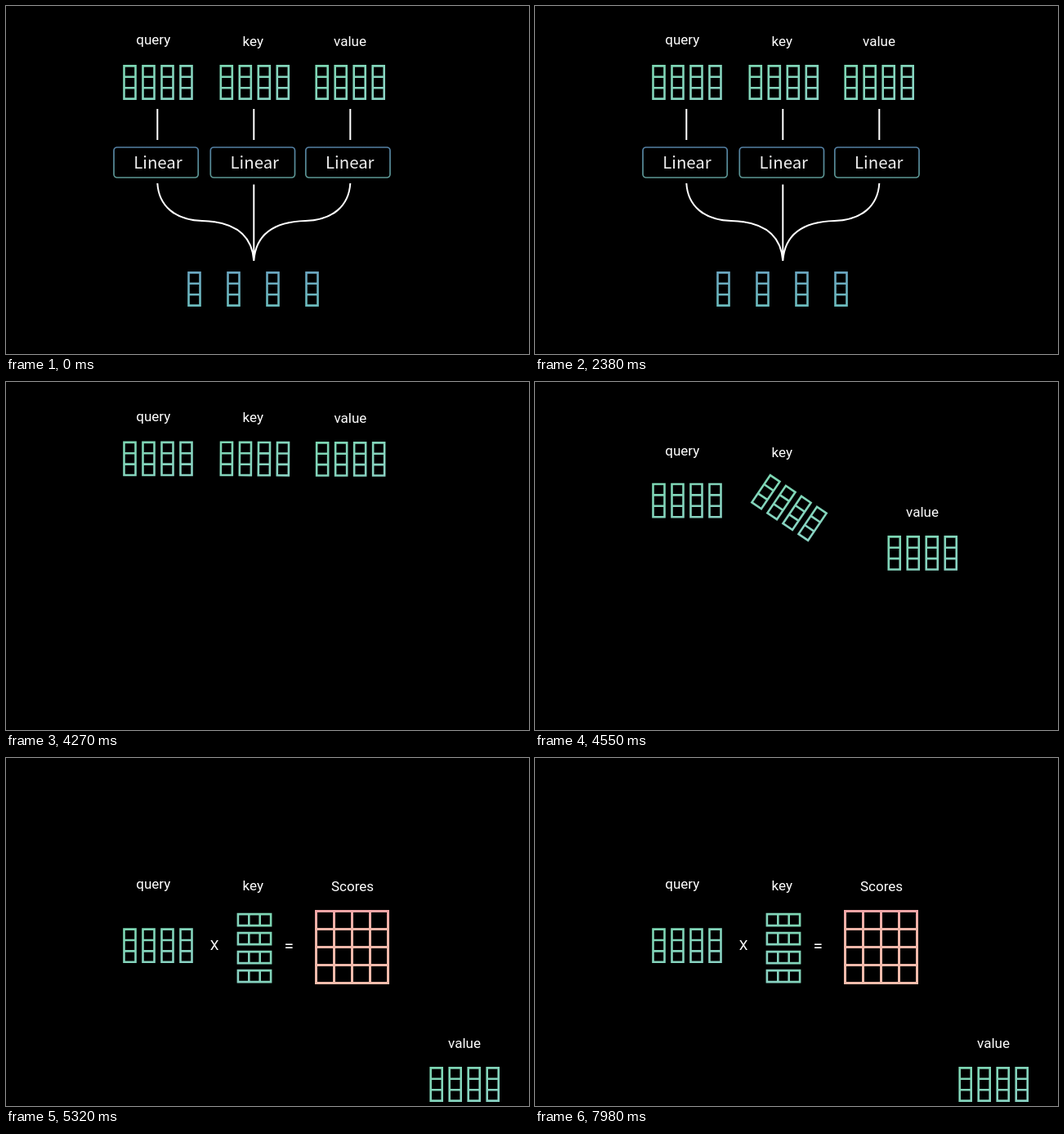
An HTML page that plays this animation: 640 px wide and 426 px high, repeating every 8000 ms.

```html
<!DOCTYPE html>
<html lang="en">
<head>
<meta charset="utf-8">
<style>
  html, body { margin: 0; width: 100%; height: 100%; overflow: hidden; background: #000; }
  svg { display: block; }
  text { font: 17px Roboto, sans-serif; fill: #fff; text-anchor: middle; }
  .linear { font: 500 20.4px "Noto Sans CJK SC", "Noto Sans CJK JP", "Open Sans", sans-serif; fill: #f0f0f0; }
  .sign { font-size: 21px; }
  path, rect { fill: none; }
  .wire { stroke: #fff; stroke-width: 2; }
  .block { stroke-width: 2.6; }
  .frame { stroke: url(#frame); stroke-width: 1.7; }
  .grid { stroke: url(#pink); stroke-width: 3; }
</style>
</head>
<body>
<svg id="stage" width="640" height="426" viewBox="0 0 640 426">
  <defs>
    <linearGradient id="green" x2="1" y2="1"><stop stop-color="#7cd6b2"/><stop offset="1" stop-color="#8ad2c4"/></linearGradient>
    <linearGradient id="blue" x2="0" y2="1"><stop stop-color="#6aa6c0"/><stop offset="1" stop-color="#6cbcbe"/></linearGradient>
    <linearGradient id="frame" x2="0" y2="1"><stop stop-color="#5480a4"/><stop offset="1" stop-color="#5c9793"/></linearGradient>
    <linearGradient id="pink" x2="0" y2="1"><stop stop-color="#f2a4a6"/><stop offset=".25" stop-color="#f0b4a8"/><stop offset="1" stop-color="#f2bcac"/></linearGradient>
  </defs>
</svg>
<script>
const stage = document.getElementById('stage');
const LOOP = 8000;

function add(parent, tag, attrs = {}, text = '') {
  const el = document.createElementNS('http://www.w3.org/2000/svg', tag);
  for (const name in attrs) el.setAttribute(name, attrs[name]);
  el.textContent = text;
  parent.append(el);
  return el;
}
const label = (parent, x, y, text, cls = '') => add(parent, 'text', { x, y, class: cls }, text);

// Four columns of three cells, centred on (cx, cy).
function columns(parent, cx, cy, pitch, stroke) {
  let d = '';
  for (let i = 0; i < 4; i++) {
    const x = cx + (i - 1.5) * pitch - 7, y = cy - 20.1;
    d += `M${x} ${y}h14v40.2h-14zM${x} ${y + 13.4}h14M${x} ${y + 26.8}h14`;
  }
  return add(parent, 'path', { d, class: 'block', stroke: `url(#${stroke})` });
}

// Linear layers, wires and the projected vectors
const layers = add(stage, 'g');
add(layers, 'path', { class: 'wire', d:
  'M185.3 126v38M303.3 126v38M421.3 126v38M303.3 218.5V312' +
  'M185.3 217C187 245 207 262 240 263C278 264 301 279 303.3 312' +
  'M421.3 217C419.6 245 399.6 262 366.6 263C328.6 264 305.6 279 303.3 312' });
for (const x of [132, 250.3, 366.8]) {
  add(layers, 'rect', { x, y: 173, width: 103.2, height: 37, rx: 4, class: 'frame' });
  label(layers, x + 54, 198.7, 'Linear', 'linear');
}
columns(layers, 302.5, 346.5, 48, 'blue');

// Inputs
const names = [[180.3, 47.2, 'query'], [302.3, 48.7, 'key'], [421, 48.7, 'value']]
  .map(([x, y, text]) => label(stage, x, y, text));
const blocks = [186, 304.3, 421.2].map(x => columns(stage, x, 93.5, 23, 'green'));

// Multiplication and its result
const result = add(stage, 'g');
label(result, 255, 235, 'X');
label(result, 346.2, 236.6, '=', 'sign');
label(result, 424, 163.2, 'Scores');
let grid = '';
for (let i = 0; i < 5; i++) {
  grid += `M378 ${187.5 + 22 * i}h91M${379.5 + 22 * i} 186v91`;
}
add(result, 'path', { d: grid, class: 'grid' });

const progress = (t, from, to) => Math.min(1, Math.max(0, (t - from) / (to - from)));
const ease = p => p < .5 ? 4 * p ** 3 : 1 - 4 * (1 - p) ** 3;
const shift = (el, x, y) => el.setAttribute('transform', `translate(${x} ${y})`);

function draw(t) {
  layers.setAttribute('opacity', 1 - progress(t, 3780, 4200));
  result.setAttribute('opacity', progress(t, 4980, 5270));

  const p = ease(progress(t, 4200, 4970));
  shift(names[0], 0, 113 * p);
  shift(names[1], 0, 113.5 * p);
  shift(names[2], 140 * p, 306 * p);
  shift(blocks[0], 0, 136.2 * p);
  shift(blocks[2], 140 * p, 306 * p);
  // The key block turns a quarter around a point near its first column.
  blocks[1].setAttribute('transform',
    `translate(${42 * p} ${106.8 * p}) rotate(${90 * p} 267 88.5)`);
}

function tick() {
  draw(performance.now() % LOOP);
  requestAnimationFrame(tick);
}
tick();
</script>
</body>
</html>
```
